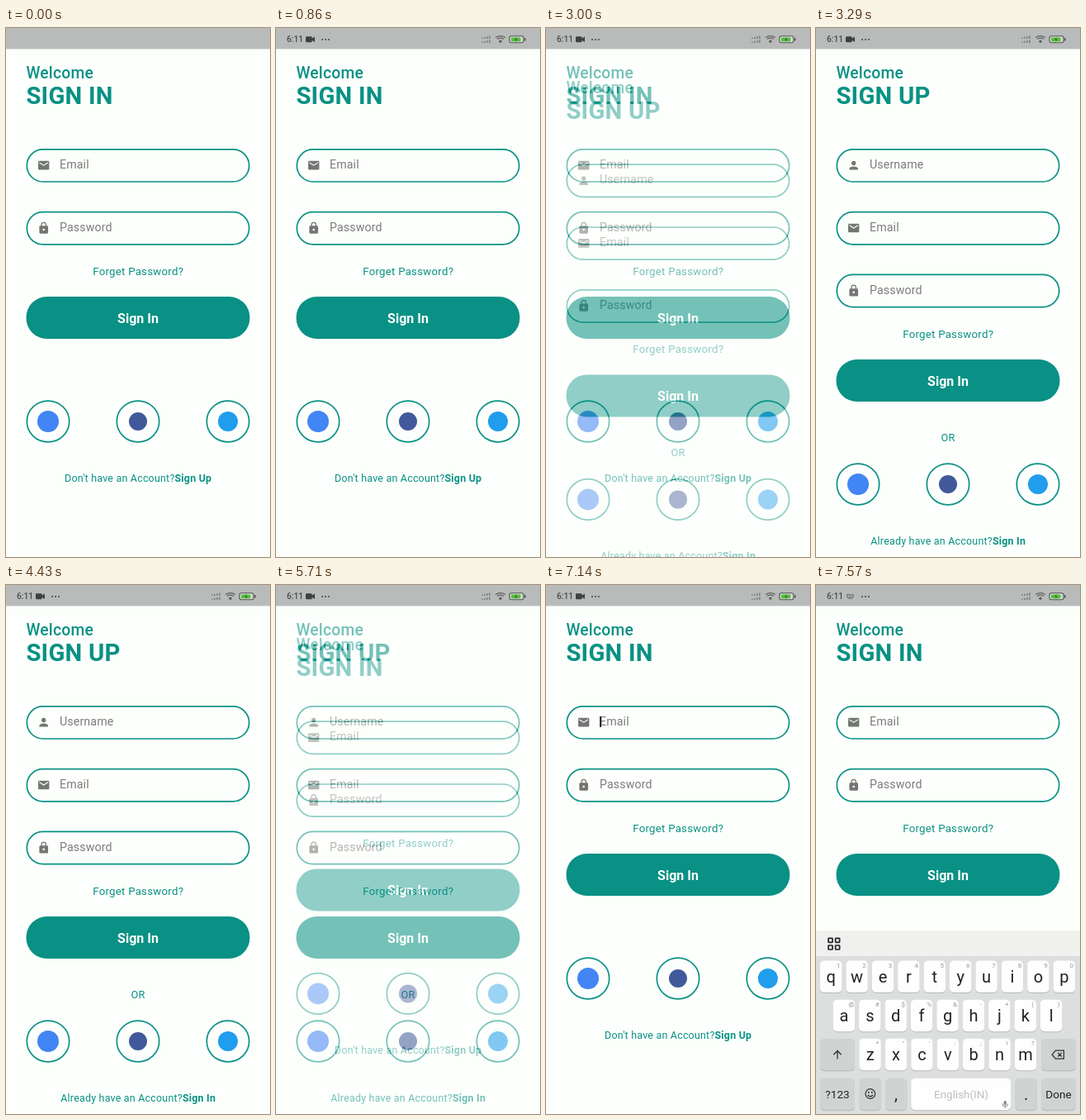
Write an HTML page that moves like this. It is 320 by 640 pixels and loops after 8000 ms.

```html
<!DOCTYPE html>
<html lang="en">
<head>
<meta charset="utf-8">
<title>Sign in and sign up</title>
<style>
  html, body { margin: 0; width: 100%; height: 100%; overflow: hidden; background: #fdfffc; }
  svg { display: block; width: 100vw; height: 100vh; font-family: Roboto, sans-serif; }
  .teal { fill: #089184; letter-spacing: .22px; }
  .line { fill: none; stroke: #089184; stroke-width: 1.7; }
  .hint { fill: #7b7c7b; font-size: 14.2px; letter-spacing: .13px; }
  .icon { fill: #747674; }
  .mid { text-anchor: middle; }
  .bold { font-weight: 700; }
  .key { fill: #202221; font-size: 20px; }
  .small { fill: #969998; font-size: 8px; }
</style>
</head>
<body>
<svg id="stage" viewBox="0 0 320 640"></svg>
<script>
const ICONS = {
  mail: 'M20 4H4c-1.1 0-2 .9-2 2v12c0 1.1.9 2 2 2h16c1.1 0 2-.9 2-2V6c0-1.1-.9-2-2-2zm0 4l-8 5-8-5V6l8 5 8-5v2z',
  lock: 'M18 8h-1V6a5 5 0 0 0-10 0v2H6c-1.1 0-2 .9-2 2v10c0 1.1.9 2 2 2h12c1.1 0 2-.9 2-2V10c0-1.1-.9-2-2-2zm-6 9a2 2 0 1 1 0-4 2 2 0 0 1 0 4zm3.1-9H8.9V6a3.1 3.1 0 0 1 6.2 0z',
  user: 'M12 12a4 4 0 1 0 0-8 4 4 0 0 0 0 8zm0 2c-2.7 0-8 1.3-8 4v2h16v-2c0-2.7-5.3-4-8-4z'
};
const ROW_GAP = 76;
const escapeText = s => s.replace(/&/g, '&amp;').replace(/</g, '&lt;');

const text = (x, y, s, cls, size) =>
  `<text x="${x}" y="${y}" class="${cls}"${size ? ` font-size="${size}"` : ''}>${escapeText(s)}</text>`;

const box = (x, y, w, h, r, fill) =>
  `<rect x="${x}" y="${y}" width="${w}" height="${h}" rx="${r}" fill="${fill}"/>`;

const field = ([icon, label], i) => `
  <g transform="translate(0 ${i * 75.8})">
    <rect x="25.3" y="146.8" width="269.4" height="39.2" rx="19.6" class="line"/>
    <path d="${ICONS[icon]}" class="icon" transform="translate(37.7 158.2) scale(.667)"/>
    ${text(65, 170, label, 'hint')}
  </g>`;

const social = (x, color, r) => `
  <ellipse cx="${x}" cy="476" rx="25.7" ry="24.8" class="line"/>
  <circle cx="${x}" cy="476" r="${r}" fill="${color}"/>`;

function page(title, fields, question, action, withOr) {
  const drop = (fields.length - 2) * ROW_GAP;
  return `
    <rect width="320" height="640" fill="#fdfffc"/>
    <text x="24.4" y="61" class="teal" font-size="19.3" font-weight="500">Welcome</text>
    ${text(24.4, 92, title, 'teal bold', 29.3)}
    ${fields.map(field).join('')}
    <g transform="translate(0 ${drop})">
      ${text(160.2, 298.5, 'Forget Password?', 'teal mid', 13.3)}
      ${box(24.5, 325, 271, 51, 25, '#089184')}
      <text x="160" y="357" class="mid bold" fill="#fdfffc" font-size="16">Sign In</text>
      ${withOr ? text(160, 424, 'OR', 'teal mid', 12.8) : ''}
      ${social(51, '#4285f4', 13)}
      ${social(160, '#41599b', 11)}
      ${social(269, '#209ded', 12)}
      <text x="160.2" y="549" class="teal mid" font-size="12.44">${question}<tspan class="bold">${action}</tspan></text>
    </g>`;
}

const signIn = page('SIGN IN', [['mail', 'Email'], ['lock', 'Password']],
  "Don't have an Account?", 'Sign Up', false);
const signUp = page('SIGN UP', [['user', 'Username'], ['mail', 'Email'], ['lock', 'Password']],
  'Already have an Account?', 'Sign In', true);

function statusIcons() {
  const bars = y => [0, 1, 2, 3].map(i =>
    box(249 + i * 3, y - 1.5 - i * .7, 1.8, 1.5 + i * .7, 0, '#858786')).join('');
  const arc = r => `<path d="M${272 - r} ${17.5 - r}Q272 ${17 - r * 1.55} ${272 + r} ${17.5 - r}" fill="none" stroke="#606261" stroke-width="1.2"/>`;
  return `
    <text x="13" y="17.4" font-size="10.2" font-weight="500" fill="#4b4d4c">6:11</text>
    <g id="camera" fill="#3f4140">${box(36, 10.2, 7.6, 7, 1, '#3f4140')}<path d="M43 13l4-2.6v6.6l-4-2.6z"/></g>
    <g id="face" fill="none" stroke="#7d7f7e">
      <path d="M37.5 11.5h8v2.5q0 2.5-4 2.5t-4-2.5z" fill="#8c8e8d"/><path d="M39 13.2h1.5m2 0H44" stroke="#d5d7d6"/>
    </g>
    ${[56, 60, 64].map(x => `<circle cx="${x}" cy="14" r="1" fill="#444645"/>`).join('')}
    ${bars(13)}${bars(18)}
    ${arc(6)}${arc(4)}<circle cx="272" cy="16.3" r="1.7" fill="#606261"/>
    <rect x="283" y="9.8" width="17" height="8" rx="2.2" fill="#d3dbd0" stroke="#525553" stroke-width="1.1"/>
    ${box(285, 11.4, 11.5, 4.8, 1, '#55bd3f')}${box(301, 12, 1.6, 3.6, .6, '#525553')}
    <path d="M291.6 10.8l-2.4 3.4h1.8l-.8 2.8 2.6-3.6h-1.9z" fill="#375c30"/>`;
}

function keyboard() {
  const key = (x, y, w, fill = '#fdfefd') =>
    box(x, y + 1, w, 38.4, 5, '#b5b9b7') + box(x, y, w, 38.4, 5, fill);
  const gray = '#cfd3d1';
  const row = (letters, hints, first, y) => [...letters].map((c, i) => {
    const x = first + i * 31.4;
    return key(x - 13.2, y, 26.4) + text(x, y + 26, c, 'key mid') + text(x + 9, y + 8, hints[i], 'small mid');
  }).join('');
  const stroke = d => `<path d="${d}" fill="none" stroke="#303231" stroke-width="1.3"/>`;
  const squares = [[15, 427.4], [23.6, 427.4], [15, 436], [23.6, 436]].map(([x, y]) =>
    `<rect x="${x}" y="${y}" width="5" height="5" rx=".6" fill="none" stroke="#222423" stroke-width="1.7"/>`).join('');
  return `
    ${box(0, 418, 320, 32, 0, '#f0f1ef')}${box(0, 449, 320, 191, 0, '#dcdfdd')}
    ${squares}
    ${row('qwertyuiop', '1234567890', 18.2, 454.6)}
    ${row('asdfghjkl', '@#$%&-+()', 33.9, 501.8)}
    ${row('zxcvbnm', '*"\':;!?', 65.6, 548.8)}
    ${key(5, 548.8, 42, gray)}${key(273, 548.8, 42, gray)}
    ${stroke('M26 573.5v-10m-4.6 4.8l4.6-4.8 4.6 4.8')}
    ${stroke('M290.4 563.2h10v10h-10l-4.2-5zm2.8 2.7l4.6 4.6m0-4.6l-4.6 4.6')}
    ${key(5, 596.8, 42, gray)}${key(52.8, 596.8, 26.2, gray)}${key(84, 596.8, 26.2, gray)}
    ${key(115.2, 596.8, 121)}${key(241.6, 596.8, 26.2, gray)}${key(273, 596.8, 42, gray)}
    ${text(26, 621, '?123', 'key mid" style="font-size:13.6px')}
    ${text(294, 621, 'Done', 'key mid" style="font-size:13.6px')}
    ${text(97, 623, ',', 'key mid')}${text(254.7, 623, '.', 'key mid')}
    <text x="176" y="620.5" class="mid" font-size="13.4" fill="#bcc0be">English(IN)</text>
    <circle cx="65.8" cy="615.5" r="5.8" fill="none" stroke="#303231" stroke-width="1.2"/>
    ${stroke('M62.8 617q3 3.6 6 0')}
    <circle cx="63.8" cy="613.8" r=".9"/><circle cx="67.8" cy="613.8" r=".9"/>
    ${box(227.6, 624, 3.2, 5.4, 1.6, '#858987')}
    <path d="M225.8 627.5q0 3.4 3.4 3.4t3.4-3.4m-3.4 3.4v2.4" fill="none" stroke="#858987"/>`;
}

const stage = document.getElementById('stage');
stage.innerHTML = `
  <g id="first">${signIn}</g>
  <g id="second">${signUp}</g>
  <g id="third">${signIn}</g>
  <rect id="cursor" x="65.2" y="159" width="1.8" height="13" fill="#151716"/>
  <g id="keys">${keyboard()}</g>
  <rect width="320" height="25.4" fill="#b9bbba"/>
  <g id="status">${statusIcons()}</g>`;

const part = id => document.getElementById(id);
const parts = Object.fromEntries(
  ['second', 'third', 'cursor', 'keys', 'status', 'camera', 'face'].map(id => [id, part(id)]));

// Each row: start in ms, opacity, downward shift
const STEPS = {
  second: [[0, 0, 0], [3000, .44, 18.4], [3140, 1, 0]],
  third: [[0, 0, 0], [5710, .44, 18.4], [5860, 1, 0]],
  cursor: [[0, 0, 0], [7000, 1, 0], [7570, 0, 0]],
  keys: [[0, 0, 222], [7290, 1, 100], [7430, 1, 10], [7570, 1, 0]],
  status: [[0, 0, 0], [430, 1, 0]],
  camera: [[0, 1, 0], [7430, 0, 0]],
  face: [[0, 0, 0], [7430, 1, 0]]
};
const LOOP = 8000;
const start = performance.now();

function draw(now) {
  const time = Math.max(0, now - start) % LOOP;
  for (const [id, steps] of Object.entries(STEPS)) {
    const [, opacity, shift] = steps.filter(([from]) => from <= time).pop();
    parts[id].setAttribute('opacity', opacity);
    parts[id].setAttribute('transform', `translate(0 ${shift})`);
  }
  requestAnimationFrame(draw);
}
draw(start);
</script>
</body>
</html>
```
